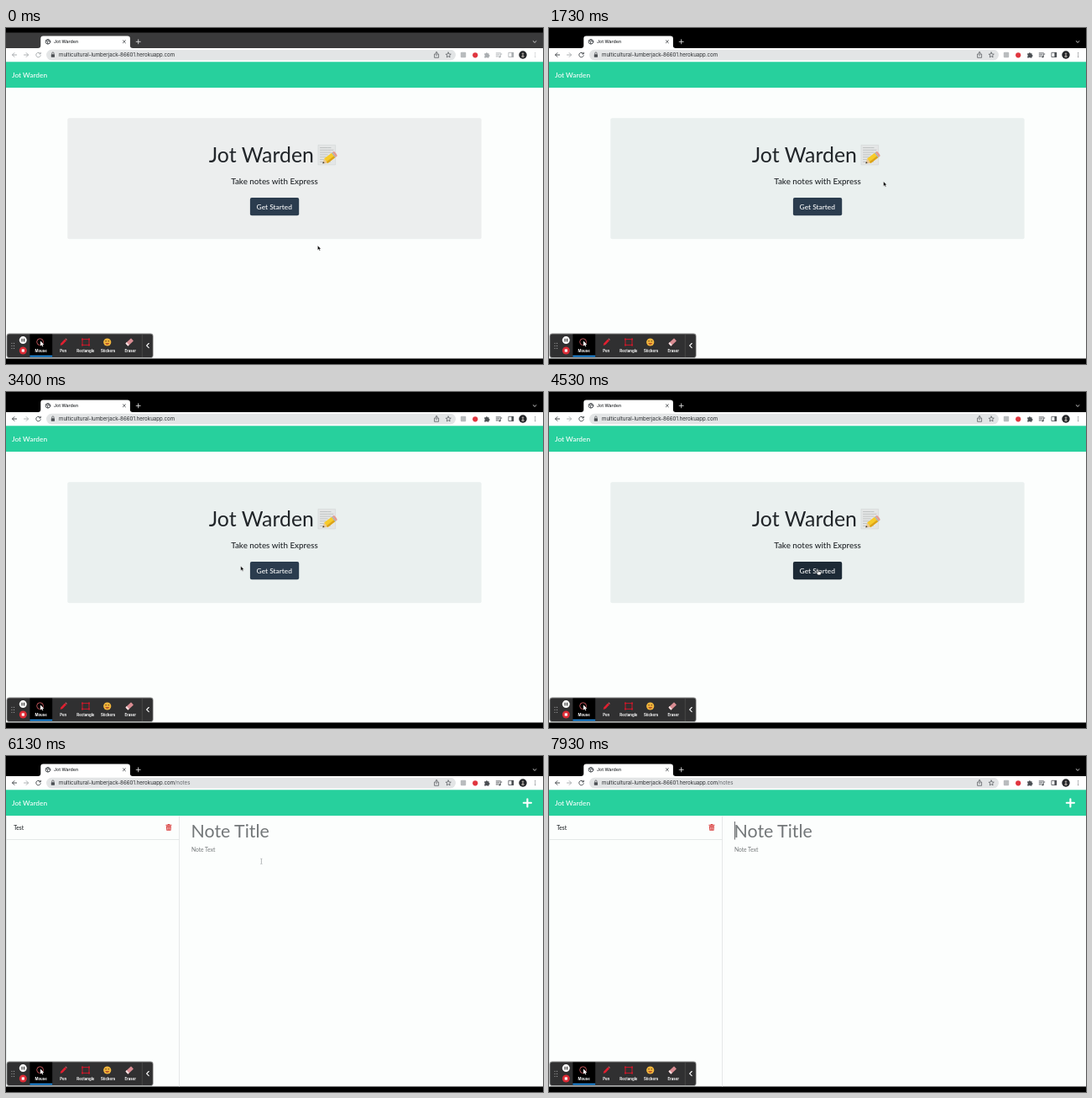
Write an HTML page that moves like this. It is 640 by 400 pixels and loops after 8000 ms.

```html
<!DOCTYPE html>
<html lang="en">
<head>
<meta charset="utf-8">
<title>Jot Warden</title>
<style>
html, body { margin: 0; width: 100%; height: 100%; overflow: hidden; background: #000; }
svg { display: block; width: 100%; height: 100%; }
text { font-family: Lato, sans-serif; white-space: pre; }
.ui { font-family: Inter, "Liberation Sans", sans-serif; }
.line { fill: none; stroke: currentColor; stroke-linecap: round; stroke-linejoin: round; }
.label { font-size: 4.3px; font-weight: 700; fill: #fff; text-anchor: middle; }
.mid { text-anchor: middle; }
.firm { font-weight: 500; }
</style>
</head>
<body>
<svg viewBox="0 0 640 400">
  <rect width="640" height="400"/>
  <rect id="strip" y="5.5" width="640" height="18.5"/>
  <rect y="24" width="640" height="369.5" fill="#fcfefd"/>

  <!-- tab strip -->
  <path d="M38 24q3.3 0 3.3-3v-8.6q0-3 3-3h100.6q3 0 3 3v8.6q0 3 3.3 3z" fill="#fff"/>
  <g class="line" color="#4b4f53" stroke-width="1">
    <circle cx="50" cy="16.3" r="2.8"/>
    <path d="M47.6 15.2l2 1 .2 2.6M50.2 13.6l-.4 1.5 2.7 1"/>
  </g>
  <text class="ui firm" x="57" y="18.2" font-size="5.33" fill="#25282b">Jot Warden</text>
  <path class="line" color="#33363a" stroke-width=".8" d="M139.4 14.8l3 3m0-3l-3 3"/>
  <path class="line" color="#ddd" stroke-width=".9" d="M155.2 16.3h5m-2.5-2.5v5M628.2 15.6l1.9 1.8 1.9-1.8"/>

  <!-- address bar -->
  <rect y="24" width="640" height="16" fill="#fff"/>
  <rect x="48" y="25.8" width="488" height="12.6" rx="6.3" fill="#e3e5e6"/>
  <g id="tools">
    <path class="line" stroke-width="1" d="M12.6 32h-5m2.3-2.4L7.5 32l2.4 2.4"/>
    <path class="line" color="#aeb1b3" stroke-width="1" d="M21.5 32h5m-2.3-2.4l2.4 2.4-2.4 2.4"/>
    <path class="line" stroke-width="1" d="M41 30.6a2.8 2.8 0 1 0 .3 2.2M41.3 29.2v1.7h-1.7"/>
    <path fill="currentColor" d="M570.2 30.3h1.7a1 1 0 0 1 2 0h1.7v1.7a1 1 0 0 1 0 2v1.5h-2a1 1 0 0 0-1.8 0h-1.6v-1.7a1 1 0 0 0 0-1.8z"/>
    <path class="line" stroke-width=".9" d="M584.2 29.9h5.2m-5.2 2h3.4m-3.4 2h2.2m2.8 .5v-3.4h1.6"/>
    <circle cx="588.3" cy="34.3" r="1.1" fill="currentColor"/>
    <rect class="line" x="599.3" y="29.3" width="5.4" height="5.2" stroke-width=".8"/>
    <path fill="currentColor" d="M602.4 29h2.6v5.8h-2.6z"/>
    <g fill="currentColor"><circle cx="630.7" cy="29.8" r=".6"/><circle cx="630.7" cy="32" r=".6"/><circle cx="630.7" cy="34.2" r=".6"/></g>
  </g>
  <g class="line" color="#4b4f53" stroke-width=".7">
    <path d="M512 31h-1.4v4.3h5V31h-1.4M513.1 33v-4.4m-1.3 1.2l1.3-1.3 1.3 1.3"/>
    <path d="M527.2 29l.9 2 2.2.2-1.7 1.5.5 2.2-1.9-1.2-1.9 1.2.5-2.2-1.7-1.5 2.2-.2z"/>
  </g>
  <rect x="541.8" y="28.8" width="6.4" height="6.4" rx="1" fill="#b9bcbe"/>
  <circle cx="559.2" cy="32.3" r="3.1" fill="#e0363f"/>
  <circle cx="616" cy="32" r="4.7" fill="#222427"/>
  <g fill="#a09a96"><circle cx="616" cy="30.6" r="1.2"/><path d="M614.4 35q0-3 1.6-3t1.6 3z"/></g>
  <rect x="53.8" y="31.2" width="4.2" height="3.5" rx=".5" fill="#4c5054"/>
  <path class="line" color="#4c5054" stroke-width=".7" d="M54.7 31v-.9a1.2 1.2 0 0 1 2.4 0v.9"/>
  <text class="ui" x="63" y="34.2" font-size="6.15" fill="#25282b">multicultural-lumberjack-86601.herokuapp.com<tspan id="path" fill="#63676b">/notes</tspan></text>

  <!-- page header -->
  <rect y="40.3" width="640" height="30.8" fill="#27d09d"/>
  <text class="firm" x="7" y="58.9" font-size="8.33" fill="#fff">Jot Warden</text>

  <g id="home">
    <rect id="panel" x="73.3" y="107.2" width="493.3" height="144" rx="2"/>
    <text class="mid" x="304.4" y="160" font-size="24.9" fill="#212529">Jot Warden</text>
    <g>
      <path d="M372 139.3h20.6v23.6H372z" fill="#e4e6e6" stroke="#cdd0d0" stroke-width=".5"/>
      <path class="line" color="#a7abac" stroke-width=".6" stroke-dasharray="3 .8 5 .8" d="M374.5 142.5h13m-13 2.8h15.5m-15.5 2.8h13m-13 2.8h9m-9 2.8h7m-7 2.8h4m-4 2.8h12"/>
      <g transform="translate(377.3 161.2) rotate(-37)">
        <path d="M0 0l5-3.5v7z" fill="#e9c795"/>
        <path d="M0 0l1.9-1.3v2.6z" fill="#333"/>
        <path d="M5-3.5h11v7H5z" fill="#f7cb2a"/>
        <path d="M5 1.2h11v2.3H5z" fill="#dba21a"/>
        <path d="M16-3.5h1.5v7H16z" fill="#a9b0ae"/>
        <path d="M17.5-3.5h1.2q1.3 0 1.3 3.5t-1.3 3.5h-1.2z" fill="#e59a90"/>
      </g>
    </g>
    <text class="mid firm" x="320" y="185.6" font-size="9.85" fill="#212529">Take notes with Express</text>
    <rect id="button" x="290.9" y="201.9" width="58.3" height="21.3" rx="2"/>
    <text class="mid firm" x="319.8" y="215.6" font-size="8.4" fill="#fff">Get Started</text>
  </g>

  <g id="notes">
    <path d="M.4 71.5V393.5M206.5 71.5V393.5M0 99.5h206.5" fill="none" stroke="#dfe2e2" stroke-width=".8"/>
    <text class="firm" x="9.2" y="88.2" font-size="6.67" fill="#212529">Test</text>
    <g fill="#d9403f">
      <path d="M190.4 81.7h2l.5-.8h2l.5.8h2v1.1h-7z"/>
      <path d="M190.9 83.3h6l-.4 5.5h-5.2z"/>
    </g>
    <path d="M192.5 84.5v3.2m1.4-3.2v3.2m1.4-3.2v3.2" stroke="#fff" stroke-width=".55"/>
    <path d="M621.4 51.2v9.2M616.8 55.8h9.2" stroke="#fff" stroke-width="2.1" stroke-linecap="round"/>
    <text x="220.6" y="96.7" font-size="21.33" fill="#737779">Note Title</text>
    <text x="221" y="113.7" font-size="6.67" fill="#737779">Note Text</text>
    <path id="caret" d="M221.4 78v21.5" stroke="#3a3d40" stroke-width=".8"/>
  </g>

  <!-- recording toolbar -->
  <rect x=".6" y="363.6" width="175" height="29.2" rx="3.4" fill="#8b8c8c"/>
  <rect x="1.4" y="364.4" width="173.4" height="27.6" rx="2.8" fill="#303031"/>
  <rect x="28.4" y="364.6" width="26.8" height="27.2" fill="#000"/>
  <path d="M28.4 389.8h26.8v1.7H28.4z" fill="#2196f3"/>
  <path d="M162.3 365v27" stroke="#505051" stroke-width=".7"/>
  <path d="M7 375.3v7M9.6 375.3v7" class="line" color="#aaa" stroke-width="1.2" stroke-dasharray="0 3"/>
  <circle cx="20.3" cy="371.6" r="4.5" fill="#fff"/>
  <path d="M19.1 369.7v3.8m2.4-3.8v3.8" stroke="#222" stroke-width="1.1"/>
  <circle cx="20.3" cy="384" r="4.5" fill="#dc2b35"/>
  <rect x="18.7" y="382.4" width="3.2" height="3.2" fill="#fff"/>
  <circle cx="40.6" cy="373.7" r="3.9" fill="none" stroke="#cf5a60" stroke-width=".9"/>
  <path d="M41 372.6v6l1.4-1.3 1 2 1-.5-1-1.9h1.9z" fill="#fff"/>
  <path d="M64.6 378.1l.9-2.9 4.5-4.8 2 1.9-4.5 4.8z" fill="#e01f30"/>
  <path d="M70.5 369.9l.6-.5 1.7 1.7-.5.6z" fill="#f06a74"/>
  <rect x="91" y="370.6" width="8" height="6.8" fill="none" stroke="#c9182a" stroke-width="1"/>
  <path d="M90 369.6h2v2h-2zM98 369.6h2v2h-2zM90 376.4h2v2h-2zM98 376.4h2v2h-2z" fill="#c9182a"/>
  <circle cx="120.7" cy="374" r="4.6" fill="#f3b63c"/>
  <path d="M118.2 372.8h1.8m1.4 0h1.8" stroke="#5b3d18" stroke-width=".9"/>
  <path d="M118.2 375h5q-.5 2-2.5 2t-2.5-2z" fill="#b5542a"/>
  <g transform="translate(147.2 374) rotate(-42)">
    <rect x="-4.6" y="-2.2" width="9.2" height="4.4" rx=".8" fill="#d98c92"/>
    <path d="M-2.6-2.2h-1.2q-.8 0-.8.8v2.8q0 .8.8.8h1.2z" fill="#f3e3e3"/>
  </g>
  <g id="labels"></g>
  <path class="line" color="#fff" stroke-width="1.1" d="M170.2 375.5l-2.6 2.6 2.6 2.6"/>

  <g id="cursor">
    <path id="arrow" d="M0 0v5.6l1.3-1.2.9 2 1-.5-.9-1.9h1.7z" fill="#000" stroke="#fff" stroke-width=".45"/>
    <path id="hand" d="M-.6-2.2q.7-.8 1.2 0v2l2.2.6q.6.3.4 1.2l-.6 2.2H-.5L-2.6 1q-.1-.9.7-.6l1.3.9z" fill="#fff" stroke="#111" stroke-width=".4"/>
    <path id="beam" d="M-.9-3.2q.7 0 .9.5.2-.5.9-.5M0-2.7v5.4M-.9 3.2q.7 0 .9-.5.2.5.9.5" fill="none" stroke="#7b7f82" stroke-width=".55"/>
  </g>
</svg>
<script>
const LOOP = 8000, FOCUS = 60, HOVER = 4260, OPEN = 4860, EDIT = 7830;
const $ = id => document.getElementById(id);
const show = (id, on) => $(id).setAttribute("visibility", on ? "inherit" : "hidden");

// time, x, y of the pointer's hot spot
const path = [
  [0, 371.4, 258.9], [60, 371.4, 258.9], [730, 390, 194.3], [1730, 398.6, 182.8],
  [2900, 300, 196], [3400, 279.7, 207.2], [4400, 321, 214], [5660, 321, 214],
  [6130, 304.4, 125.4], [6730, 283, 97], [7000, 283, 97], [7860, 252.3, 85.6], [LOOP, 252.3, 85.6]
];

$("labels").innerHTML = ["Mouse", "Pen", "Rectangle", "Stickers", "Eraser"]
  .map((name, i) => `<text class="label ui" x="${41.6 + i * 26.65}" y="385.6">${name}</text>`).join("");

function pointer(t) {
  const i = path.findIndex(p => p[0] > t);
  const [a, b] = [path[i - 1], path[i]];
  const k = (t - a[0]) / (b[0] - a[0]), e = k * k * (3 - 2 * k);
  return [a[1] + (b[1] - a[1]) * e, a[2] + (b[2] - a[2]) * e];
}

function mix(from, to, k) {
  return `rgb(${from.map((v, i) => Math.round(v + (to[i] - v) * k))})`;
}

function render(t) {
  const focused = t >= FOCUS, opened = t >= OPEN;
  const [x, y] = pointer(t);
  const hover = Math.min(1, Math.max(0, (t - HOVER) / 150));
  const shape = t < HOVER ? "arrow" : t < 5700 ? "hand" : "beam";

  $("strip").setAttribute("fill", focused ? "#000" : "#3a3a3b");
  $("tools").setAttribute("color", focused ? "#4b4f53" : "#a9adb0");
  $("panel").setAttribute("fill", focused ? "#eaf0ef" : "#eceeee");
  $("button").setAttribute("fill", mix([43, 60, 78], [29, 42, 54], hover));
  show("home", !opened);
  show("notes", opened);
  show("path", opened);
  show("caret", t >= EDIT);
  for (const id of ["arrow", "hand", "beam"]) show(id, id === shape);
  $("cursor").setAttribute("transform", `translate(${x.toFixed(2)} ${y.toFixed(2)})`);
}

const start = performance.now();
function tick() {
  render((performance.now() - start) % LOOP);
  requestAnimationFrame(tick);
}
tick();
</script>
</body>
</html>
```
